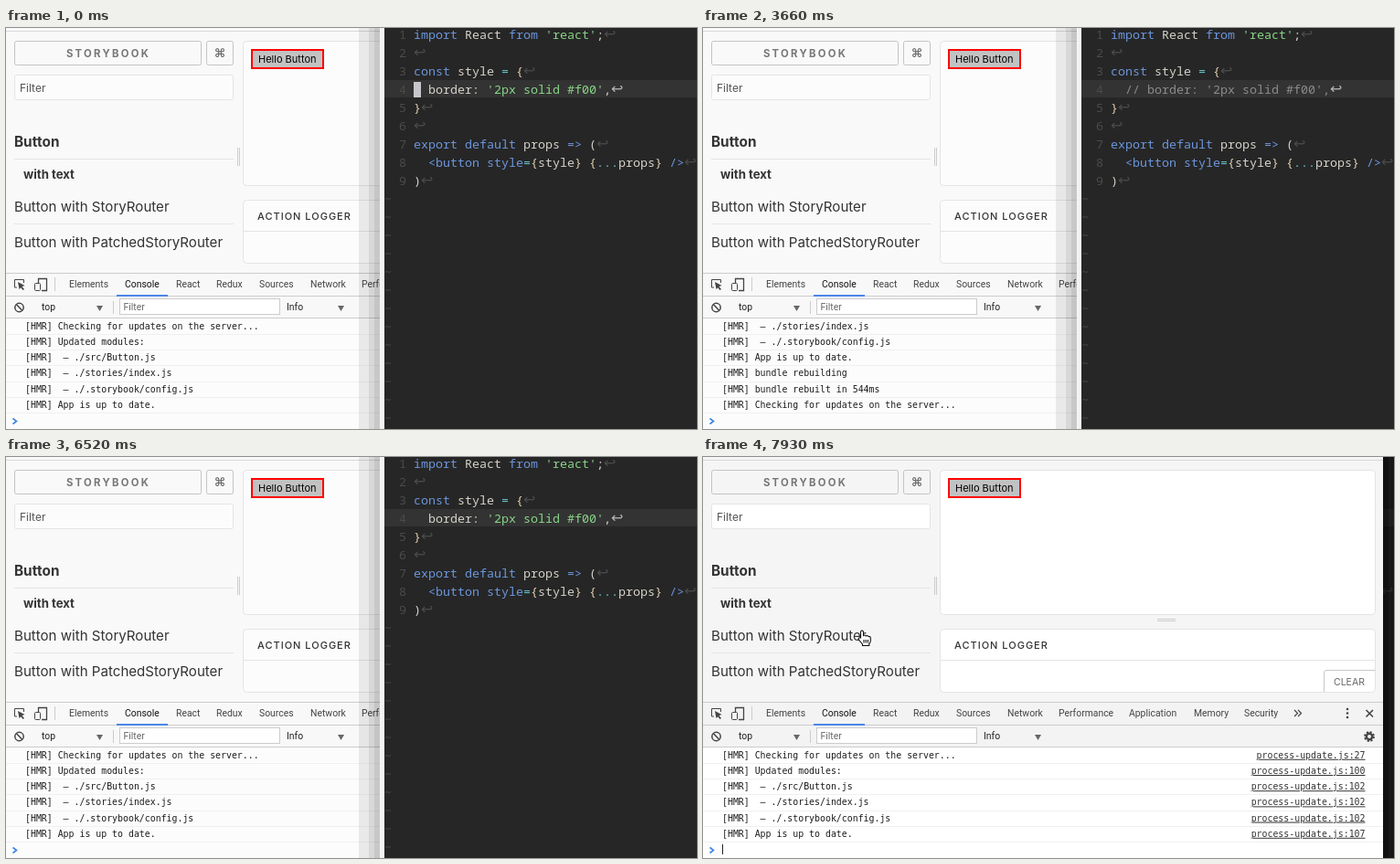
These frames come from a looping animation (756x439 px, 8 s). An HTML page:

```html
<!DOCTYPE html>
<html lang="en">
<head>
<meta charset="utf-8">
<title>Hot reload</title>
<style>
html, body { margin: 0; width: 100%; height: 100%; overflow: hidden; background: #262626; }
svg { display: block; width: 756px; height: 439px; }
text { white-space: pre; }
.ui { font-family: Inter, sans-serif; }
.dev { font-family: Roboto, sans-serif; }
.log { font-family: "DejaVu Sans Mono", monospace; }
.code { font-family: "Noto Sans Mono", "DejaVu Sans Mono", monospace; }
.eol { font: 16px "DejaVu Sans", sans-serif; }
</style>
</head>
<body>
<svg id="stage" viewBox="0 0 756 439"></svg>
<script>
const LOOP = 8000;
const stage = document.getElementById('stage');

const rect = (x, y, w, h, fill, more = '') =>
  `<rect x="${x}" y="${y}" width="${w}" height="${h}" fill="${fill}" ${more}/>`;
const box = (x, y, w, h, fill, stroke, r = 2) =>
  rect(x + .5, y + .5, w - 1, h - 1, fill, `stroke="${stroke}" rx="${r}"`);
const path = (d, stroke, fill = 'none', w = 1) =>
  `<path d="${d}" fill="${fill}" stroke="${stroke}" stroke-width="${w}"/>`;
const text = (cls, x, y, size, fill, str, more = '') =>
  `<text class="${cls}" x="${x}" y="${y}" font-size="${size}" fill="${fill}" ${more}>${str}</text>`;

// Latest value of a [time, value] list
const at = (steps, t) => steps.reduce((v, s) => t >= s[0] ? s[1] : v, null);

// ---- editor ----
const COL = 8, ROW = 20, LEFT = 446, BASE = 11.5;
const C = { k: '#6c96dc', w: '#d6d2ca', s: '#8ad488', o: '#68c8cc', b: '#e0cfae', c: '#8b8b8b', e: '#4b4b4b' };
const LINES = [
  [['k', 'import '], ['w', 'React '], ['k', 'from '], ['s', "'react'"], ['w', ';']],
  [],
  [['k', 'const '], ['w', 'style '], ['o', '= '], ['b', '{']],
  null,
  [['b', '}']],
  [],
  [['k', 'export default '], ['w', 'props '], ['k', '=&gt; '], ['w', '(']],
  [['k', '  &lt;button style'], ['o', '='], ['b', '{'], ['w', 'style'], ['b', '} {'],
   ['o', '...'], ['w', 'props'], ['b', '} '], ['k', '/&gt;']],
  [['w', ')']]
];
const PREFIX = [[0, ''], [1530, '/'], [1620, '//'], [1800, '// '], [4470, '']];
// Caret: column and shape
const CARET = [
  [0, [0, 'block']], [180, [2, 'block']], [1350, [2, 'bar']], [1530, [3, 'bar']], [1620, [4, 'bar']],
  [1800, [5, 'bar']], [2150, [5, 'block']], [2240, [4, 'block']], [2420, [4, 'off']], [2590, [4, 'block']],
  [3390, [4, 'off']], [3930, [4, 'block']], [4470, [2, 'block']], [5010, [2, 'off']], [5280, [2, 'block']],
  [6520, [2, 'off']], [6700, [2, 'block']]
];

function styleLine(prefix) {
  const value = "'2px solid #f00'";
  return prefix.length > 1
    ? [['c', `  ${prefix}border: ${value},`]]
    : [['w', `  ${prefix}border: `], ['s', value], ['w', ',']];
}

function editor(t) {
  const [col, shape] = at(CARET, t);
  const prefix = at(PREFIX, t);
  const x = LEFT + col * COL;
  let s = rect(409, 0, 347, 439, '#262626') + rect(409, 0, 5, 439, '#f4f4f4') + rect(414, 57, 342, 19, '#333');
  if (shape === 'block') s += rect(x, 59, COL, 17, t < 180 ? '#c6c6cc' : t >= 6520 ? '#c9c9da' : '#fff');
  if (shape === 'bar') s += rect(x, 59, 1.5, 17, '#fff');
  LINES.forEach((line, i) => {
    const y = BASE + i * ROW;
    const parts = (line || styleLine(prefix)).map(p => `<tspan fill="${C[p[0]]}">${p[1]}</tspan>`).join('');
    s += text('code', 430, y, 13.333, C.e, i + 1);
    s += text('code', LEFT, y, 13.333, C.w, `${parts}<tspan class="eol" fill="${line ? C.e : '#b4b4b4'}">↩</tspan>`);
  });
  if (shape === 'block' && col === 2 && !prefix) s += text('code', x, BASE + 3 * ROW, 13.333, '#333', 'b');
  for (let i = 9; i < 22; i++) s += text('code', 414, BASE + i * ROW, 13.333, C.e, '~');
  return s;
}

// ---- browser page ----
function page(t, active) {
  const ink = '#333', line = '#e4e4e4';
  const bg = active ? '#f5f5f5' : '#f9f9f9', panel = active ? '#fff' : '#fcfcfc';
  const red = t < 3750 || t >= 6170;
  let s = rect(0, 0, 744, 268, bg) + rect(0, 3, 744, 1, '#d8d8d8');
  s += box(9, 14, 205, 27, bg, '#c4c4c4') + box(219, 14, 30, 27, bg, '#c4c4c4');
  s += text('ui', 66, 31.5, 11.3, '#777', 'STORYBOOK', 'font-weight="700" letter-spacing="2.3"');
  s += `<text x="234" y="32" font-size="13" fill="#666" text-anchor="middle" font-weight="700" font-family="DejaVu Sans, sans-serif">⌘</text>`;
  s += box(9, 51, 240, 28, panel, '#e4e4e4') + text('ui', 15, 70, 12, '#555', 'Filter');
  s += text('ui', 9, 130, 15.3, ink, 'Button', 'font-weight="700"');
  s += text('ui', 19, 165, 13.2, ink, 'with text', 'font-weight="700"');
  s += text('ui', 9, 201, 15.1, ink, 'Button with StoryRouter');
  s += text('ui', 9, 240, 15.1, ink, 'Button with PatchedStoryRouter');
  s += rect(9, 143, 240, 1, line) + rect(9, 214, 240, 1, line);
  s += rect(253, 131, 1, 20, '#ccc') + rect(255, 131, 1, 20, '#ccc');
  s += rect(497, 177, 20, 1, '#ccc') + rect(497, 179, 20, 1, '#ccc');
  s += box(259, 14, 477, 159, panel, line, 4) + box(259, 188, 477, 70, panel, line, 4) + rect(260, 222, 475, 1, line);
  s += text('ui', 275, 210, 11, ink, 'ACTION LOGGER', 'font-weight="500" letter-spacing="1"');
  s += path('M679.5 257V236Q679.5 233.5 682 233.5H735.5', '#c8c8c8') + text('ui', 690, 250, 10.5, '#666', 'CLEAR');
  s += red ? rect(269, 24, 78, 20, '#c2c2c2', 'stroke="#f00" stroke-width="2"')
           : box(268, 24, 80, 17, '#fff', '#d0d0d0', 3);
  return s + text('ui', 276, red ? 38 : 37, 11, '#000', 'Hello Button');
}

// ---- developer tools ----
const TABS = [[69, 'Elements'], [130, 'Console'], [186, 'React'], [230, 'Redux'], [277, 'Sources'], [333, 'Network'],
  [389, 'Performance'], [466, 'Application'], [537, 'Memory'], [592, 'Security']];
const LOG = [['bundle rebuilding', 10], ['bundle rebuilt in 544ms', 16], ['Checking for updates on the server...', 27],
  ['Updated modules:', 100], [' – ./src/Button.js', 102], [' – ./stories/index.js', 102],
  [' – ./.storybook/config.js', 102], ['App is up to date.', 107]];
const COUNT = [[0, 8], [3120, 9], [3660, 11], [3750, 16], [5630, 17], [6080, 19], [6170, 24]];

function tools(t, active) {
  const bar = active ? '#f3f3f3' : '#f8f8f8', ink = '#444';
  let s = rect(0, 268, 744, 50, bar) + rect(0, 318, 744, 121, active ? '#fff' : '#fcfcfc');
  for (const y of [268, 293, 317]) s += rect(0, y, 744, 1, '#ccc');
  s += rect(121, 292, 56, 2, '#4a86e8');
  TABS.forEach(([x, name]) => s += text('dev', x, 284, 10.4, name === 'Console' ? '#111' : ink, name));
  s += path('M12 284H9.5V275.5H19.5V279', ink) + path('M13 278L20.5 282L17.5 283L20 286L18.5 287L16.3 284.2L14.5 286Z', 'none', ink);
  s += path('M35.5 279V274.5H44.5V287.5H39', ink, 'none', 1.3) + box(31, 279, 7, 9, bar, ink, 1);
  s += rect(53, 273, 1, 15, '#ccc') + rect(117, 299, 1, 14, '#ccc');
  s += `<circle cx="14.5" cy="306" r="4.7" fill="none" stroke="${ink}" stroke-width="1.5"/>` + path('M11.5 302.7L17.7 309.3', ink, 'none', 1.5);
  s += text('dev', 39, 309, 10.4, '#222', 'top') + text('dev', 307, 309, 10.4, '#222', 'Info');
  for (const x of [99, 363]) s += path(`M${x} 304H${x + 7}L${x + 3.5} 310Z`, 'none', '#666');
  s += box(124, 296, 176, 18, '#fff', '#ccc', 0) + text('dev', 128.5, 309, 10.4, '#666', 'Filter');
  s += path('M647 277L650.5 280.5L647 284M651 277L654.5 280.5L651 284', ink, 'none', 1.2);
  for (const y of [276, 280.5, 285]) s += `<circle cx="705" cy="${y}" r="1.3" fill="${ink}"/>`;
  s += path('M725.5 277L733 284.5M733 277L725.5 284.5', ink, 'none', 1.6);
  s += `<circle cx="729" cy="306" r="4.8" fill="none" stroke="${ink}" stroke-width="2.2" stroke-dasharray="2.1 1.67"/>`;
  s += `<circle cx="729" cy="306" r="3.2" fill="none" stroke="${ink}" stroke-width="2.4"/>`;
  const count = at(COUNT, t);
  for (let i = 0; i < 6; i++) {
    const [msg, num] = LOG[(count - 6 + i) % 8], y = 329.8 + i * 17.2;
    s += text('log', 21, y, 9.88, '#1c1c1c', '[HMR] ' + msg);
    s += text('log', 724.5, y, 9.88, '#333', 'process-update.js:' + num, 'text-anchor="end" text-decoration="underline"');
    s += rect(0, Math.round(335 + i * 17.2), 744, 1, '#f0f0f0');
  }
  s += path('M7.5 427.5L11.5 430.5L7.5 433.5', '#3b83e0', 'none', 1.6);
  return s + (t >= 7660 ? rect(21, 424, 1, 11, '#222') : '');
}

// ---- mouse ----
const MOUSE = [[6610, [475, 338]], [6700, [432, 312]], [6770, [372, 275]], [6860, [308, 239]], [6950, [266, 219]],
  [7130, [226, 199]], [7220, [194, 185]], [7300, [182, 181]], [7810, [178, 185]], [7930, [174, 190]]];

function mouse(t) {
  const p = at(MOUSE, t);
  if (!p) return '';
  const shape = t < 7660
    ? path('M0 0V14.2L3.2 11.3L5.6 17L8.2 15.9L5.8 10.4H10.2Z', '#fff', '#111')
    : path('M-1.5 8V1.2Q0 -1.2 1.5 1.2V5.5Q3.2 4.2 4.2 6Q6 4.8 7 6.6Q9.3 6 9.3 8.5V11Q9.3 13 7.8 14.5V16.5H.5V15L-3.8 9.8Q-3.8 7.2 -1.5 8ZM2 10V13.5M4.2 10V13.5M6.4 10V13.5', '#111', '#fff', 1.1);
  return `<g transform="translate(${p})">${shape}</g>`;
}

function scene(t) {
  const front = t >= 7480, active = t >= 7660;
  const win = page(t, active) + tools(t, active);
  let s = editor(t);
  if (active) s += rect(744, 0, 6, 439, '#000', 'opacity=".55"') + rect(750, 0, 6, 439, '#000', 'opacity=".4"');
  if (front) s += win;
  else {
    s += `<clipPath id="left"><path d="M0 0H409V439H0Z"/></clipPath><g clip-path="url(#left)">${win}`;
    for (const x of [386, 397, 403]) s += rect(x, 0, 409 - x, 439, '#000', 'opacity=".075"');
    s += '</g>';
  }
  return s + mouse(t);
}

let last = '';
function frame() {
  const next = scene(performance.now() % LOOP);
  if (next !== last) stage.innerHTML = last = next;
  requestAnimationFrame(frame);
}
frame();
</script>
</body>
</html>
```
